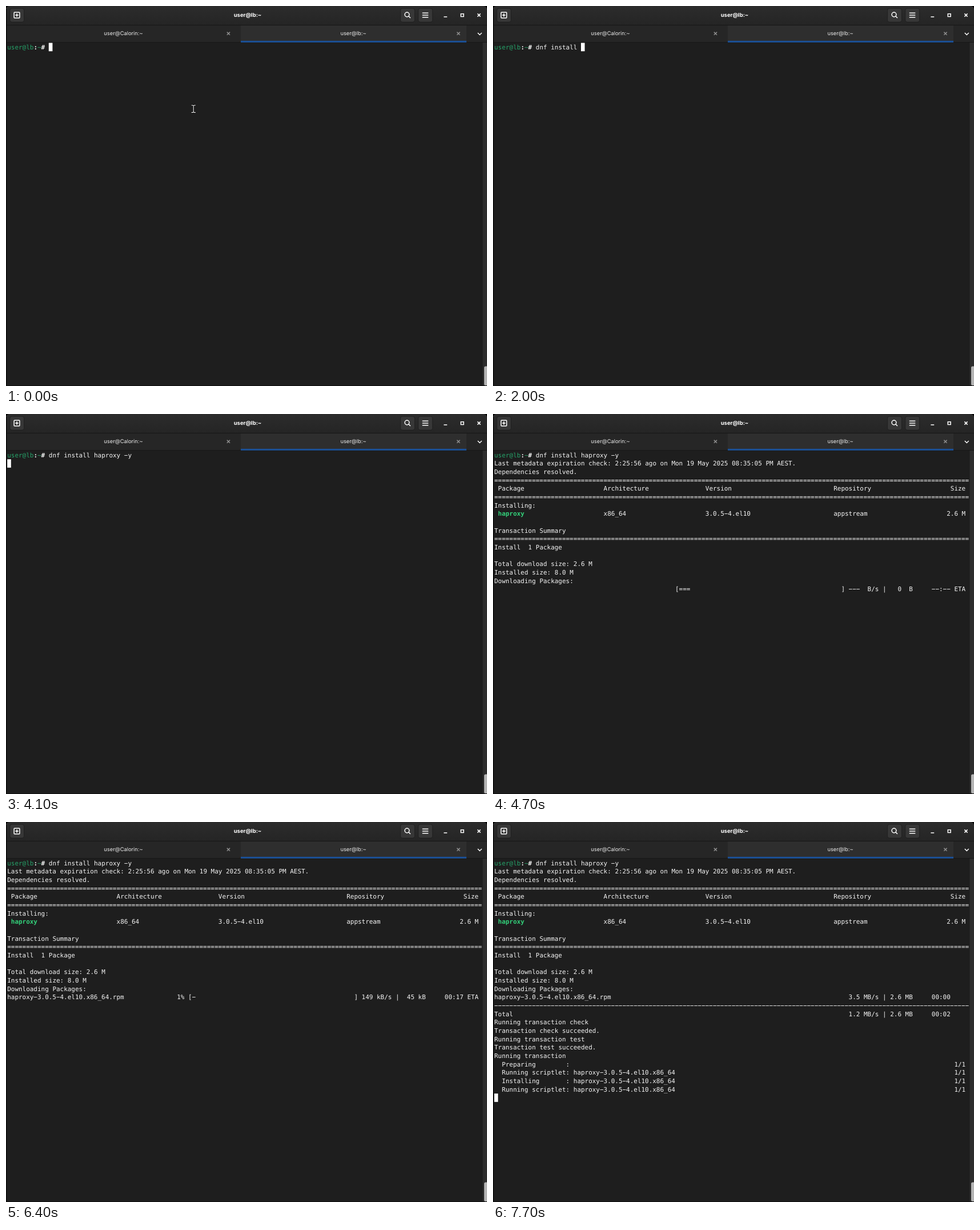
These frames come from a looping animation (842 px wide and 665 px high, 8 s). An HTML page:

```html
<!DOCTYPE html>
<html lang="en">
<head>
<meta charset="utf-8">
<title>Terminal</title>
<style>
  html, body { margin: 0; width: 100%; height: 100%; overflow: hidden; background: #1e1e1e; }
  svg { display: block; width: 842px; height: 665px; }
  text { text-rendering: geometricPrecision; }
  .ui { font-family: Inter, sans-serif; font-size: 9.3px; fill: #ededed; text-anchor: middle; }
  .title { font-size: 9.5px; font-weight: 700; fill: #fff; }
  #screen text { font-family: "DejaVu Sans Mono", monospace; font-size: 10.963px; white-space: pre; }
  .icon { fill: none; stroke: #fff; stroke-width: 1.5; }
  .dim { stroke: #8c8c8c; }
</style>
</head>
<body>
<svg viewBox="0 0 842 665">
  <defs>
    <linearGradient id="bar" x1="0" y1="0" x2="0" y2="1">
      <stop offset="0" stop-color="#2c2c2c"/>
      <stop offset="1" stop-color="#252525"/>
    </linearGradient>
    <path id="beam" d="M324.6 173.8h2.4l1.2 1 1.2-1h2.4M328.2 174.6v11M324.6 186.4h2.4l1.2-1 1.2 1h2.4"/>
    <path id="cross" d="M-2.6-2.6l5.2 5.2M2.6-2.6l-5.2 5.2"/>
  </defs>
  <rect width="842" height="665" fill="#1e1e1e"/>
  <rect width="842" height="33" fill="url(#bar)"/>
  <rect y="33" width="842" height="1" fill="#161616"/>
  <rect y="34" width="842" height="29" fill="#262626"/>
  <rect x="411" y="34" width="395" height="29" fill="#2e2e2e"/>
  <rect y="63" width="842" height="1" fill="#171717"/>
  <rect x="411" y="60.87" width="395" height="2.93" fill="#1b5199"/>
  <path d="M0 0H5Q1 1 0 5ZM842 0H837Q841 1 842 5Z" fill="#000"/>

  <g fill="#373737" stroke="#1b1b1b" stroke-width=".75">
    <rect x="6.8" y="4.1" width="24.8" height="24" rx="3.5"/>
    <rect x="690.5" y="4.1" width="25" height="24" rx="3.5"/>
    <rect x="721.7" y="4.1" width="25" height="24" rx="3.5"/>
  </g>
  <g class="icon">
    <rect x="14.1" y="11.1" width="9.8" height="9.8" rx="1"/>
    <path d="M19 13.2v5.6M16.2 16h5.6"/>
    <circle cx="702" cy="15" r="3.9"/>
    <path d="M704.8 17.8l3.2 3.2M728.8 12.25h10.5M728.8 16h10.5M728.8 19.75h10.5"/>
    <path d="M766.4 18.9h5.8M825.8 47l3.5 3.5 3.5-3.5"/>
    <rect x="796.3" y="13.7" width="4.8" height="4.8"/>
    <use href="#cross" x="828" y="16"/>
    <use href="#cross" class="dim" x="389.4" y="48.2"/>
    <use href="#cross" class="dim" x="792" y="48.2"/>
  </g>
  <text class="ui title" x="423" y="19.4">user@lb:~</text>
  <text class="ui" x="205.5" y="51.4">user@Calorin:~</text>
  <text class="ui" x="608" y="51.4">user@lb:~</text>

  <rect x="834.5" y="64" width="7.5" height="600" fill="#2d2d2d"/>
  <rect x="837" y="630.5" width="7" height="33.5" rx="2.5" fill="#b4b4b4"/>
  <rect y="5" width="1.4" height="660" fill="#0b0b0b"/>
  <rect y="664" width="842" height="1" fill="#101010"/>

  <g id="screen"></g>
  <g id="mouse" fill="none">
    <use href="#beam" stroke="#000" stroke-width="2.6"/>
    <use href="#beam" stroke="#fff" stroke-width="1.1"/>
  </g>
</svg>
<script>
const LOOP = 8000, COLS = 126, CELL = 6.6, LINE = 14.667;
const LEFT = 2.2, TOP = 64.53, BASE = TOP + 11;
const FG = '#f4f4f4', BG = '#1e1e1e', GREEN = '#26a269', BRIGHT = '#33d17a';
const screen = document.getElementById('screen');
const mouse = document.getElementById('mouse');

const PROMPT = 'user@lb:~# ';
const COMMAND = 'dnf install haproxy -y';
const KEYS = [400, 500, 600, 1100, 1200, 1300, 1400, 1400, 1600, 1600, 1800, 2000,
  2200, 2300, 2500, 2600, 2700, 2900, 3000, 3300, 3800, 4000];
const ENTER = 4100, BLINK = 600, DONE = 6700;

// Builds a line from alternating columns and strings
function row(...parts) {
  let s = '';
  for (let i = 0; i < parts.length; i += 2) s = s.padEnd(parts[i]) + parts[i + 1];
  return s;
}
const rule = ch => ch.repeat(COLS);
const pkg = 'haproxy-3.0.5-4.el10.x86_64';
const rpm = pkg + '.rpm';
const step = (label, name = '') => row(2, label, 19, ': ' + name, 122, '1/1');
const sum = (name, speed, time) => row(0, name, 94, speed + ' | 2.6 MB', 116, time);
const progress = (name, pct, bar, speed, size, eta) =>
  row(0, name, 44, pct, 48, '[' + bar, 92, ']', 94, speed.padEnd(8) + ' | ' + size, 116, eta + ' ETA');

// Lines added at each time
const OUTPUT = [
  [4600, 'Last metadata expiration check: 2:25:56 ago on Mon 19 May 2025 08:35:05 PM AEST.'],
  [4700, 'Dependencies resolved.', rule('='),
    row(1, 'Package', 29, 'Architecture', 56, 'Version', 90, 'Repository', 121, 'Size'),
    rule('='), 'Installing:',
    row(1, 'haproxy', 29, 'x86_64', 56, '3.0.5-4.el10', 90, 'appstream', 120, '2.6 M'),
    '', 'Transaction Summary', rule('='), 'Install  1 Package', '',
    'Total download size: 2.6 M', 'Installed size: 8.0 M', 'Downloading Packages:'],
  [DONE, sum(rpm, '3.5 MB/s', '00:00'), rule('-'), sum('Total', '1.2 MB/s', '00:02')],
  [6800, 'Running transaction check'],
  [6900, 'Transaction check succeeded.', 'Running transaction test'],
  [7000, 'Transaction test succeeded.', 'Running transaction'],
  [7100, step('Preparing')],
  [7200, step('Running scriptlet', pkg), step('Installing', pkg)],
  [7300, step('Running scriptlet', pkg)]
];

const DOWNLOAD = [
  [4700, progress('', '', '===', '---  B/s', '  0  B', '--:--')],
  [5600, progress('', '', '   ===', '---  B/s', '  0  B', '--:--')],
  [6000, progress(rpm, ' 0%', '', '---  B/s', '  0  B', '--:--')],
  [6100, progress(rpm, ' 0%', '', ' 46 kB/s', ' 12 kB', '00:57')],
  [6400, progress(rpm, ' 1%', '-', '149 kB/s', ' 45 kB', '00:17')],
  [6500, progress(rpm, '12%', '=====', '816 kB/s', '326 kB', '00:02')]
];

function colorAt(r, c) {
  if (r === 0 && (c < 7 || c === 8)) return GREEN;
  return r === 7 && c < 8 ? BRIGHT : FG;
}

// Hyphens are set as minus signs, which fill the cell like the terminal's own
function glyphs(r, c, s, fill) {
  const bold = fill === BRIGHT || (r === 0 && (c === 7 || c === 9));
  return `<text x="${(LEFT + c * CELL).toFixed(2)}" y="${(BASE + r * LINE).toFixed(2)}" fill="${fill}"` +
    `${bold ? ' font-weight="700"' : ''}>${s.replace(/-/g, '\u2212')}</text>`;
}

// Each word sits on the cell grid, split where its colour changes
function drawLine(s, r) {
  let out = '';
  for (const m of s.matchAll(/\S+/g)) {
    let from = m.index;
    const end = from + m[0].length;
    for (let c = from + 1; c <= end; c++) {
      if (c === end || colorAt(r, c) !== colorAt(r, from)) {
        out += glyphs(r, from, s.slice(from, c), colorAt(r, from));
        from = c;
      }
    }
  }
  return out;
}

function state(t) {
  const typed = KEYS.filter(k => k <= t).length;
  const lines = [PROMPT + COMMAND.slice(0, typed)];
  if (t < ENTER) return { lines, r: 0, c: PROMPT.length + typed, on: true };
  for (const [at, ...added] of OUTPUT) if (at <= t) lines.push(...added);
  const r = lines.length;
  if (t < DONE) {
    const now = DOWNLOAD.filter(d => d[0] <= t).pop();
    if (now) lines.push(now[1]);
  }
  return { lines, r, c: 0, on: Math.floor((t - ENTER) / BLINK) % 2 === 0 };
}

let last = '';
function draw(t) {
  const { lines, r, c, on } = state(t);
  let html = lines.map(drawLine).join('');
  if (on) {
    html += `<rect x="${LEFT + c * CELL}" y="${TOP + r * LINE}" width="${CELL}" height="${LINE}" fill="#fff"/>`;
    const under = (lines[r] || '')[c];
    if (under && under !== ' ') html += glyphs(r, c, under, BG);
  }
  if (html !== last) screen.innerHTML = last = html;
  mouse.style.display = t < KEYS[0] ? '' : 'none';
}

const start = performance.now();
function tick() {
  draw((performance.now() - start) % LOOP);
  requestAnimationFrame(tick);
}
draw(0);
requestAnimationFrame(tick);
</script>
</body>
</html>
```
